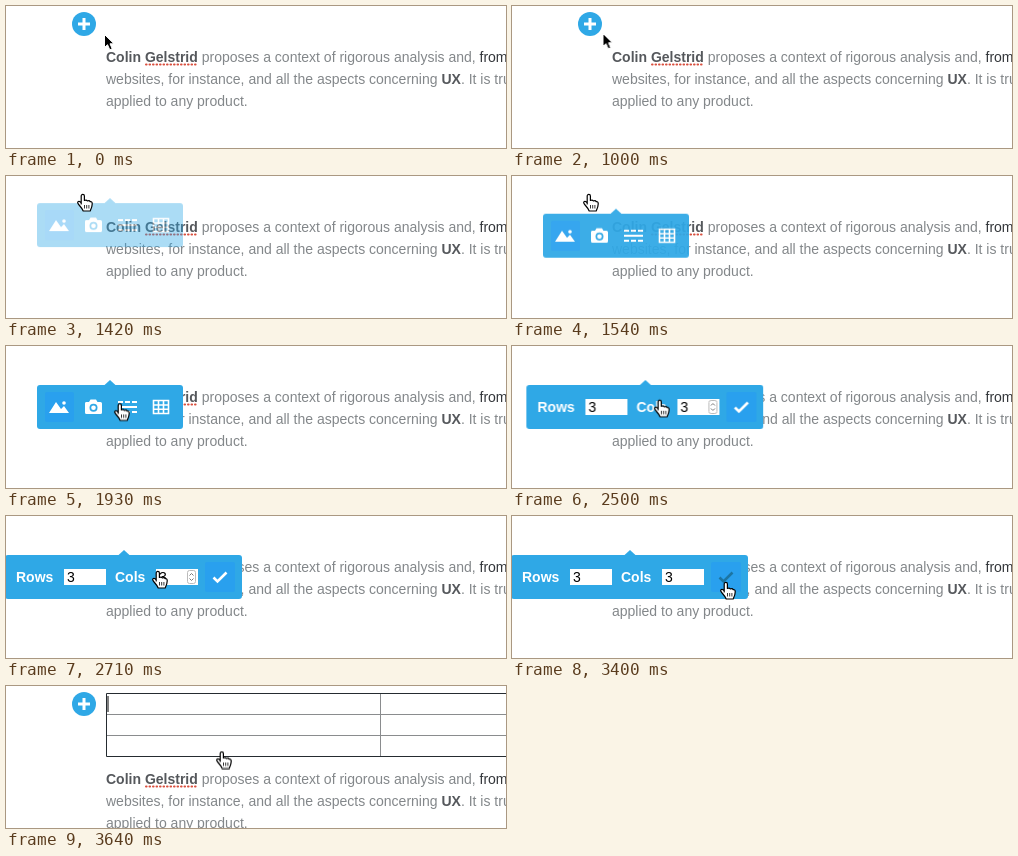
These frames come from a looping animation (500 px wide and 142 px high, 6640 ms). An HTML page:

```html
<!DOCTYPE html>
<html lang="en">
<head>
<meta charset="utf-8">
<title>Inserting a table</title>
<style>
  html, body { margin: 0; width: 100%; height: 100%; overflow: hidden; background: #fff; }
  svg { display: block; width: 500px; height: 142px; font: 14px "Liberation Sans", Arial, sans-serif; }
  .prose { fill: #83878a; }
  .prose .strong { fill: #55585c; font-weight: bold; }
  .prose .dark { fill: #33363a; }
  .blue { fill: #2fa8e6; }
  .focus { fill: #29a0ee; }
  .label { fill: #fff; font-weight: bold; }
  .icon { fill: #fff; }
  .line { fill: none; stroke: #fff; stroke-width: 2; }
  .hand { fill: #fff; stroke: #000; stroke-width: 1.2; stroke-linejoin: round; }

  /* One loop: 6640 ms, shared by every part */
  .anim { animation: 6640ms linear infinite; }
  .plus { animation-name: plus; animation-timing-function: step-end; }
  .prose { animation-name: prose; animation-timing-function: step-end; }
  .table { animation-name: table; animation-timing-function: step-end; }
  .tools { animation-name: tools; }
  .form { animation-name: form; }
  .grid { animation-name: grid; animation-timing-function: step-end; }
  .check { animation-name: check; animation-timing-function: step-end; }
  .spinner { animation-name: spinner; animation-timing-function: step-end; }
  .arrow { animation-name: arrow; }
  .pointer { animation-name: pointer; }

  @keyframes plus {
    0% { opacity: 1; }
    20.03% { opacity: 0; }
    54.819%, 100% { opacity: 1; }
  }
  @keyframes prose {
    0% { transform: none; }
    54.819%, 100% { transform: translateY(42px); }
  }
  @keyframes table {
    0% { opacity: 0; }
    54.819%, 100% { opacity: 1; }
  }
  @keyframes tools {
    0%, 20.03% { opacity: 0; transform: translateY(-20px); }
    23.42%, 36.74% { opacity: 1; transform: none; }
    36.75%, 100% { opacity: 0; transform: none; }
  }
  @keyframes form {
    0%, 36.74% { opacity: 0; transform: translateX(31px); }
    36.75% { opacity: 1; transform: translateX(31px); animation-timing-function: ease-out; }
    39.4%, 54.818% { opacity: 1; transform: none; }
    54.819%, 100% { opacity: 0; transform: none; }
  }
  @keyframes grid {
    0% { stroke: #fff; }
    32.1%, 100% { stroke: #1c7cb0; }
  }
  @keyframes check {
    0% { stroke: #fff; }
    47.4%, 100% { stroke: #1c75a2; }
  }
  @keyframes spinner {
    0% { opacity: 0; }
    37.65% { opacity: 1; }
    42.9%, 100% { opacity: 0; }
  }
  @keyframes arrow {
    0%, 15.059% { opacity: 1; transform: translate(98px, 28px); }
    15.06%, 15.5% { opacity: 1; transform: translate(90.5px, 27px); }
    17.31% { opacity: 1; transform: translate(79px, 19px); }
    17.32%, 100% { opacity: 0; transform: translate(79px, 19px); }
  }
  @keyframes pointer {
    0%, 17.31% { opacity: 0; transform: translate(77px, 18px); }
    17.32%, 25.6% { opacity: 1; transform: translate(77px, 18px); animation-timing-function: ease-in; }
    29.52% { transform: translate(122px, 66px); }
    31.3% { transform: translate(156px, 68px); animation-timing-function: ease-out; }
    33.5%, 37% { transform: translate(147px, 53.5px); }
    40.81% { transform: translate(152px, 55px); animation-timing-function: ease-in; }
    43.67% { transform: translate(175px, 72px); }
    46.69% { transform: translate(206px, 72px); animation-timing-function: ease-out; }
    49.7%, 54.818% { transform: translate(214px, 66px); }
    54.819%, 100% { opacity: 1; transform: translate(216px, 65.5px); }
  }
</style>
</head>
<body>
<svg viewBox="0 0 500 142">
  <g class="prose anim">
    <text x="100" y="56"><tspan class="strong">Colin Gelstrid</tspan> proposes a context of rigorous analysis and, <tspan class="dark">from the</tspan></text>
    <text x="100" y="78">websites, for instance, and all the aspects concerning <tspan class="strong">UX</tspan>. It is true that</text>
    <text x="100" y="100">applied to any product.</text>
    <path d="M140 58.5H191" fill="none" stroke="#d9503f" stroke-width="2" stroke-linecap="round" stroke-dasharray=".6 2.9"/>
  </g>

  <g class="table anim" fill="none">
    <path d="M101 28.5H500M101 49.5H500M374.5 8V70" stroke="#8a8c8e"/>
    <path d="M500 7.5H100.5V70.5H500" stroke="#252b30"/>
    <path d="M102 10V26" stroke="#000"/>
  </g>

  <g class="plus anim">
    <circle class="blue" cx="78" cy="18" r="12"/>
    <path class="line" style="stroke-width:3" d="M72 18H84M78 12V24"/>
  </g>

  <g class="tools anim">
    <path class="blue" d="M98 39.5L104 34L110 39.5Z"/>
    <rect class="blue" x="31" y="39" width="146" height="44" rx="3"/>
    <rect class="focus" x="39" y="46" width="29" height="30" rx="2"/>
    <path class="icon" d="M43 67L50 56L55 63L58 60L63 67Z"/>
    <circle class="icon" cx="58" cy="57" r="1.8"/>
    <path class="icon" d="M80 56H83L84.500 53.500H90L91.500 56H94.500Q96 56 96 57.500V66.500Q96 68 94.500 68H80.500Q79 68 79 66.500V57.500Q79 56 80 56Z"/>
    <circle class="blue" cx="87.500" cy="61.800" r="4"/>
    <circle class="icon" cx="87.500" cy="61.800" r="2.300"/>
    <path class="line" d="M112 56H131M112 66H131" stroke-dasharray="5 2"/>
    <path class="line" d="M112 61H131"/>
    <path class="line grid anim" style="stroke-width:1.6" d="M147.500 54.500H162.500V67.500H147.500ZM147.500 59H162.500M147.500 63.300H162.500M152.500 54.500V67.500M157.500 54.500V67.500"/>
  </g>

  <g class="form anim">
    <path class="blue" d="M112 39.500L118 34L124 39.500Z"/>
    <rect class="blue" x="-1" y="39" width="237" height="44" rx="3"/>
    <rect class="focus" x="199" y="46" width="30" height="30" rx="2"/>
    <text class="label" x="10" y="66">Rows</text>
    <text class="label" x="109" y="66">Cols</text>
    <path fill="#fff" d="M58 53H100V69H58ZM150 53H192V69H150Z"/>
    <text x="61" y="66">3</text>
    <text x="153" y="66">3</text>
    <g class="spinner anim" fill="none" stroke="#777">
      <rect x="181.500" y="54.500" width="8" height="13" rx="2" stroke="#bbb"/>
      <path d="M183.500 59.500L185.500 57.500L187.500 59.500M183.500 62.500L185.500 64.500L187.500 62.500"/>
    </g>
    <path class="line check anim" style="stroke-width:2.6" d="M207.500 61.500L211.500 65.500L220.500 56.500"/>
  </g>

  <path class="arrow anim" d="M.5 .5V13.500L3.500 10.700L5.800 15.800L8.200 14.700L6 9.800H10Z" stroke="#fff"/>
  <g class="pointer anim">
    <path class="hand" d="M-1.800 10V2a1.600 1.600 0 0 1 3.200 0V6.500q2-1 3 .5q2-.8 2.800.6q1.800-.4 2 1.800q.2 3-2 7.600h-7q-1-2.500-4.500-6.500q-1.800-2.200-.4-3q1.400-.7 2.900 1.500Z"/>
    <path d="M1.500 11V14.500M3.700 11V14.500M5.900 11V14.500" fill="none" stroke="#000" stroke-width=".8"/>
  </g>
</svg>
</body>
</html>
```
